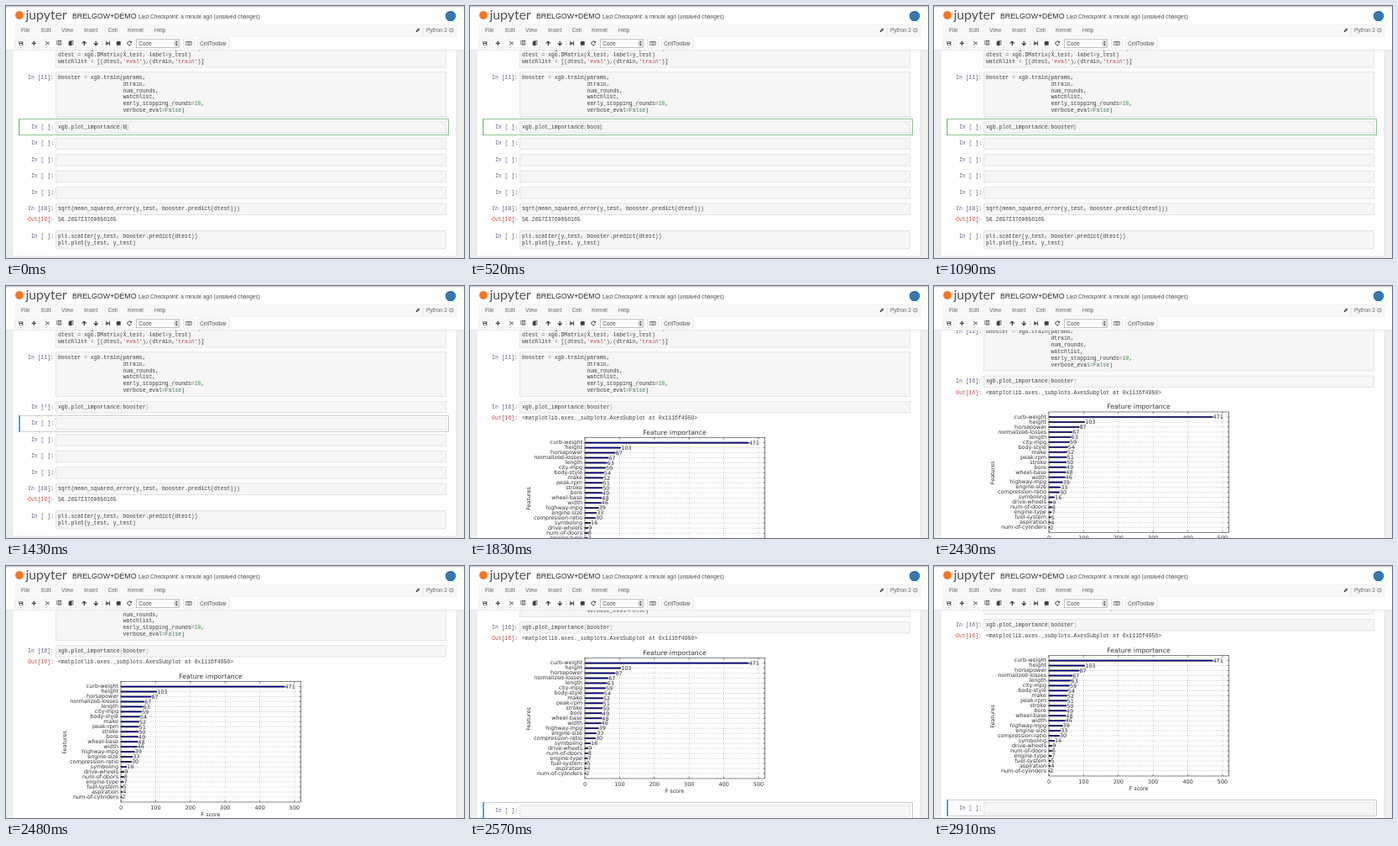
An HTML page that plays this animation: 546 by 300 pixels, repeating every 2.95 s.

```html
<!DOCTYPE html>
<html lang="en">
<head>
<meta charset="utf-8">
<title>Notebook</title>
<style>
html, body { margin: 0; width: 100%; height: 100%; overflow: hidden; background: #fff; }
svg { display: block; width: 546px; height: 300px; }
text { white-space: pre; font: 6.5px "Liberation Sans", Arial, sans-serif; fill: #4a4a4a; }
.code { font: 6.46px "Liberation Mono", "Courier New", monospace; fill: #3c3c3c; }
.in { fill: #596089; }
.out { fill: #bd4a45; }
.str { fill: #c0474a; }
.num { fill: #3a8a45; }
.key { fill: #3a7a45; }
.op { fill: #666; }
.match { fill: #7cc48a; }
.plot { font: 6.45px "DejaVu Sans", sans-serif; fill: #333; }
.box { fill: #f6f6f6; stroke: #dadada; stroke-width: .7; }
.btn { fill: #fff; stroke: #d4d4d4; stroke-width: .6; }
.icon { fill: #444; }
.line { fill: none; stroke: #444; stroke-width: 1; }
.bold { stroke-width: 1.3; }
.thin { stroke-width: .65; }
.grid { stroke: #8a8a8a; stroke-width: .5; stroke-dasharray: 1 1.7; }
.frame { fill: none; stroke: #333; stroke-width: .6; }
.bar { fill: #00f; stroke: #000; stroke-width: .6; }
</style>
</head>
<body>
<svg id="stage" viewBox="0 0 546 300"></svg>
<script>
const LOOP = 2950, STEP = 43.4;
const RUN = 1280, DONE = 1450;
const CHAR = 6.46 * 0.6;
const WORD = "booster", CALL = "xgb.plot_importance(";

const esc = s => s.replace(/&/g, "&amp;").replace(/</g, "&lt;");
const rect = (x, y, w, h, cls, extra = "") =>
  `<rect x="${x}" y="${y}" width="${w}" height="${h}" class="${cls}" ${extra}/>`;
const circle = (x, y, r, extra) => `<circle cx="${x}" cy="${y}" r="${r}" ${extra}/>`;
const text = (x, y, s, cls = "", extra = "") =>
  `<text x="${x}" y="${y}" class="${cls}" ${extra}>${esc(s)}</text>`;
const path = (d, cls) => `<path d="${d}" class="${cls}"/>`;

// --- notebook cells ---
function paint(s) {
  return s.replace(/('[^']*')|\b(False)\b|\b(\d+)\b|([=<])/g, (m, str, key, num) => {
    const cls = str ? "str" : key ? "key" : num ? "num" : "op";
    return `<tspan class="${cls}">${esc(m)}</tspan>`;
  });
}
const code = (y, s) => `<text x="62" y="${y}" class="code">${paint(s)}</text>`;
const prompt = (y, s, cls = "in", extra = "") =>
  text(57, y, s, "code " + cls, `text-anchor="end" ${extra}`);
const box = (y, h) => rect(59.4, y, 465, h, "box");

function cell(y, label, lines = []) {
  const h = 5.6 + 7.9 * Math.max(1, lines.length);
  return box(y, h) + prompt(y + 8, label) +
    lines.map((s, i) => code(y + 8 + 7.9 * i, s)).join("");
}

function selection(y, edge, side, sideWidth, id = "") {
  return `<g ${id}>` +
    rect(15.5, y, 512, 19, "", `fill="none" stroke="${edge}" stroke-width=".9"`) +
    rect(15, y - .4, sideWidth, 19.8, "", `fill="${side}"`) + "</g>";
}

// --- chart ---
const FEATURES = {
  "curb-weight": 471, "height": 103, "horsepower": 87, "normalized-losses": 67,
  "length": 63, "city-mpg": 59, "body-style": 54, "make": 52, "peak-rpm": 51,
  "stroke": 50, "bore": 49, "wheel-base": 48, "width": 46, "highway-mpg": 39,
  "engine-size": 33, "compression-ratio": 30, "symboling": 16, "drive-wheels": 9,
  "num-of-doors": 8, "engine-type": 7, "fuel-system": 5, "aspiration": 4,
  "num-of-cylinders": 2
};

function chart() {
  const left = 137, right = 351.7, top = 180.6, bottom = 324;
  const gap = (bottom - top) / 24;
  const px = v => left + v * 0.414;
  const mid = 'text-anchor="middle"';
  let grid = "", ticks = "", bars = "", labels = "";
  for (let v = 0; v <= 500; v += 100) {
    const x = px(v);
    if (v) grid += `M${x} ${top}V${bottom}`;
    ticks += `M${x} ${top}v2M${x} ${bottom}v-2`;
    labels += text(x, 332.8, String(v), "plot", mid);
  }
  Object.entries(FEATURES).forEach(([name, v], i) => {
    const y = top + gap * (i + 1);
    grid += `M${left} ${y}H${right}`;
    ticks += `M${left} ${y}h2M${right} ${y}h-2`;
    bars += rect(left, y - .6, v * 0.414, 1.2, "bar");
    labels += text(134, y + 1.9, name, "plot", 'text-anchor="end"') +
      text(px(v) + .5, y + 2.2, String(v), "plot");
  });
  return path(grid, "grid") + bars +
    rect(left, top, right - left, bottom - top, "frame") + path(ticks, "frame") + labels +
    text(244, 177, "Feature importance", "plot", mid + ' style="font-size:7.7px"') +
    text(244, 341.3, "F score", "plot", mid) +
    text(0, 0, "Features", "plot", mid + ' transform="translate(71.5 253) rotate(-90)"');
}

// --- header ---
function header() {
  const menu = [[18, "File"], [42, "Edit"], [66, "View"], [93, "Insert"],
    [121.5, "Cell"], [145, "Kernel"], [177, "Help"]];
  const groups = [[11, 13], [27, 13], [43, 41], [87, 27], [115.5, 38]];
  const button = (x, w) => rect(x, 39, w, 11, "btn", 'rx="1"');
  const page = x => rect(x, 41.3, 3.4, 4.6, "line thin");
  return rect(0, 0, 546, 52.4, "", 'fill="#fff"') +
    rect(0, 0, 546, 1.4, "", 'fill="#cfcfcf"') +
    circle(16, 11, 5, 'fill="#f37726"') +
    text(23.5, 16, "jupyter", "", 'style="font:15.8px Lato,sans-serif;fill:#4e4e4e"') +
    text(79, 14.8, "BRELGOW+DEMO", "", 'style="font-size:8.8px;fill:#2c2c2c"') +
    text(158, 14.6, "Last Checkpoint: a minute ago (unsaved changes)") +
    circle(530, 12, 6.3, 'fill="#3776ab"') +
    rect(11.3, 22.3, 525.4, 14, "", 'fill="#f8f8f8" stroke="#e8e8e8" stroke-width=".6" rx="1"') +
    menu.map(([x, s]) => text(x, 31.2, s, "", 'style="fill:#666"')).join("") +
    path("M488.5 31.2l.5-1.8 3-3 1.3 1.3-3 3z", "icon") +
    rect(497.2, 23, .6, 13, "", 'fill="#ddd"') +
    text(501, 31.2, "Python 2", "", 'style="font-size:6.3px;fill:#666"') +
    circle(531, 29, 2.1, 'class="line thin"') +
    groups.map(([x, w]) => button(x, w)).join("") +
    rect(15.4, 42, 4.8, 4.8, "icon") + rect(16.4, 42.4, 2.6, 1.5, "", 'fill="#fff"') +
    rect(16.4, 45, 2.8, 1.5, "", 'fill="#fff"') +
    path("M33.3 41.7v5.4M30.6 44.4h5.4", "line bold") +
    path("M47 42l4.5 4M47 46.6l4.5-4", "line") +
    page(60.8) + page(62.6) + rect(74.6, 42, 4, 5, "icon") + page(76.6) +
    path("M93.3 47.2v-4.6M90.8 44.6l2.5-2.5 2.5 2.5", "line bold") +
    path("M107.2 41.6v4.6M104.7 44.2l2.5 2.5 2.5-2.5", "line bold") +
    path("M119.2 41.8l3.6 2.6-3.6 2.6zM122.8 41.8h1.1v5.2h-1.1z", "icon") +
    rect(131.8, 42, 4.8, 4.8, "icon") +
    path("M149 42.8a2.4 2.4 0 1 0 .4 2.4", "line") + path("M150 41.4v2.6h-2.6z", "icon") +
    rect(155.3, 39.3, 51.2, 10.4, "", 'fill="#fff" stroke="#aaa" stroke-width=".7"') +
    text(158, 46.8, "Code") +
    rect(200.4, 39.8, 5.6, 9.4, "", 'fill="#e4e4e4"') +
    path("M201.6 43.7l1.6-2 1.6 2zM201.6 45.3l1.6 2 1.6-2z", "icon") +
    button(211.5, 13) + rect(214.8, 42.4, 6.4, 4, "line thin") +
    path("M215.8 43.8h4.4M216.8 45.2h2.6", "line thin") +
    button(228.3, 37.6) + text(231, 46.8, "CellToolbar", "", 'style="font-size:6.4px"') +
    rect(0, 52, 546, .7, "", 'fill="#ddd"');
}

// --- page ---
const pad = " ".repeat(20);
const train = ["booster = xgb.train(params,", pad + "dtrain,", pad + "num_rounds,",
  pad + "watchlist,", pad + "early_stopping_rounds=10,", pad + "verbose_eval=False)"];

document.getElementById("stage").innerHTML =
  rect(0, 0, 546, 300, "", 'fill="#eee"') +
  '<g id="page">' +
    '<rect id="sheet" x="8" y="-40" width="529" fill="#fff" stroke="#ddd" stroke-width=".7"/>' +
    box(20, 53) +
    code(52.1, "dtrain = xgb.DMatrix(X_train, label=y_train)") +
    code(60, "dtest = xgb.DMatrix(X_test, label=y_test)") +
    code(67.9, "watchlist = [(dtest,'eval'),(dtrain,'train')]") +
    cell(78.7, "In [11]:", train) +
    selection(134.6, "#7cc47f", "#66bb6a", 1.2, 'id="edit"') +
    box(137.7, 13.3) + prompt(145.9, "", "in", 'id="label"') +
    `<text x="62" y="145.9" class="code">${CALL.slice(0, -1)}<tspan class="match">(</tspan>` +
    '<tspan id="word"></tspan><tspan class="match">)</tspan></text>' +
    '<rect id="caret" y="140.5" width=".6" height="7" fill="#777"/>' +
    '<g id="before">' +
      selection(154.3, "#c4c4c4", "#42a5f5", 2, 'id="next"') +
      [157.2, 176.8, 196.2, 215.7].map(y => cell(y, "In [ ]:")).join("") +
      cell(235, "In [18]:", ["sqrt(mean_squared_error(y_test, booster.predict(dtest)))"]) +
      prompt(256.1, "Out[18]:", "out") + text(62, 256.1, "50.265723760656165", "code") +
      cell(267.6, "In [ ]:", ["plt.scatter(y_test, booster.predict(dtest))", "plt.plot(y_test, y_test)"]) +
    '</g>' +
    '<g id="after">' +
      prompt(159.2, "Out[16]:", "out") +
      text(62, 159.2, "<matplotlib.axes._subplots.AxesSubplot at 0x1116f4950>", "code") +
      chart() +
      selection(352.6, "#c4c4c4", "#42a5f5", 2) + cell(355.7, "In [ ]:") +
    '</g>' +
  '</g>' + header();

const el = Object.fromEntries(["page", "sheet", "edit", "label", "word", "caret", "before", "next", "after"]
  .map(id => [id, document.getElementById(id)]));
const show = (node, on) => node.setAttribute("display", on ? "inline" : "none");

// Scroll offset by video tick
const SCROLL = [[51, 0], [52, 6], [55, 43], [57, 71], [58, 74]];
function scrollAt(tick) {
  if (tick <= SCROLL[0][0]) return 0;
  for (let i = 1; i < SCROLL.length; i++) {
    const [a, from] = SCROLL[i - 1], [b, to] = SCROLL[i];
    if (tick <= b) return from + (to - from) * (tick - a) / (b - a);
  }
  return 74;
}

function update(t) {
  const tick = Math.floor((t - 86) / STEP);
  const typed = Math.min(WORD.length, 1 + Math.floor((t + 20) / 145));
  const running = t >= RUN, done = t >= DONE;
  el.word.textContent = WORD.slice(0, typed);
  el.caret.setAttribute("x", 62 + CHAR * (CALL.length + typed));
  el.label.textContent = done ? "In [16]:" : running ? "In [*]:" : "In [ ]:";
  show(el.edit, !running);
  show(el.caret, !running);
  show(el.next, running);
  show(el.before, !done);
  show(el.after, done);
  el.sheet.setAttribute("height", done ? 600 : 338);
  el.page.setAttribute("transform", `translate(0 ${-scrollAt(tick)})`);
}

const start = performance.now();
function loop() {
  update((performance.now() - start) % LOOP);
  requestAnimationFrame(loop);
}
update(0);
requestAnimationFrame(loop);
</script>
</body>
</html>
```
